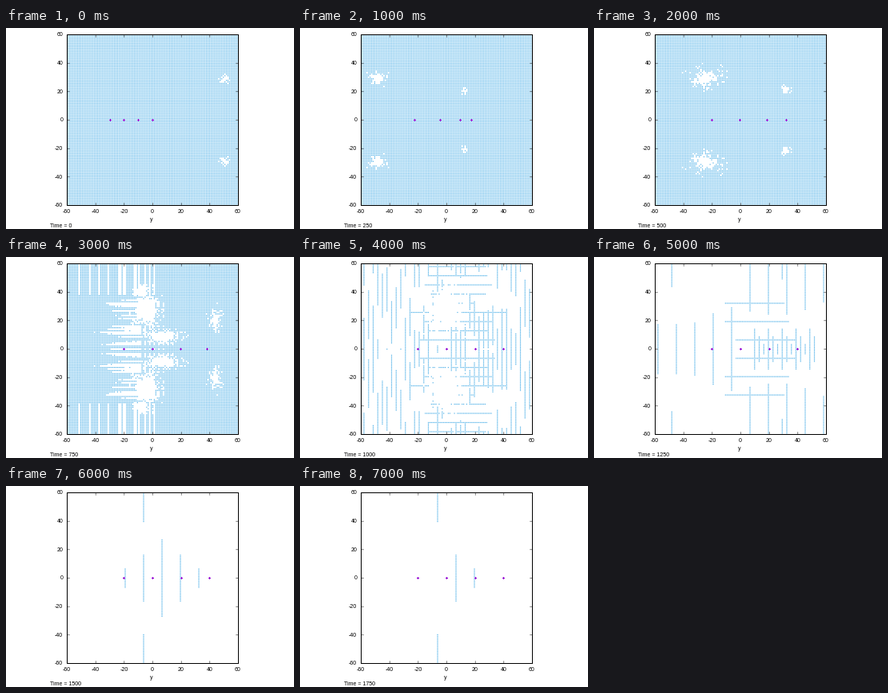
A matplotlib script that plays this animation: 360 px wide and 252 px high, repeating every 8000 ms.

```python
import numpy as np
import matplotlib.pyplot as plt
from matplotlib.animation import FuncAnimation

W, H = 360, 252
CX, CY, SCALE = 183.5, 115.5, 214 / 120
PITCH, DOT = 1.075, 1.2
SKY = np.array([0x56, 0xB4, 0xE9]) / 255
VIOLET = np.array([0x94, 0x00, 0xD3]) / 255
FRAMES, STEP = 8, 250

plt.rcParams["font.family"] = "Liberation Sans"
fig = plt.figure(figsize=(W / 72, H / 72), dpi=72, facecolor="white")
ax = fig.add_axes([0, 0, 1, 1])
ax.axis("off")


def px(x):
    return CX + SCALE * x


def py(y):
    return CY - SCALE * y


def coverage(centres, size):
    """How much of each pixel along one axis a dot at each centre covers."""
    c, e = centres[:, None], np.arange(size)[None, :]
    return np.clip(np.minimum(c + DOT / 2, e + 1) - np.maximum(c - DOT / 2, e), 0, 1)


# Lattice of test points; everything is symmetric about y = 0.
idx = np.arange(-55, 56)
I, J = np.meshgrid(idx, idx)
X, A = I * PITCH, abs(J) * PITCH
across = coverage(px(idx * PITCH), W)
down = coverage(py(idx * PITCH), H)

rng = np.random.default_rng(4)
grain = rng.random((56, 111))[abs(J), I + 55]
col_noise = rng.random(111)[I + 55]
row_noise = rng.random(56)[abs(J)]
main_col = I % 12 == 6


def hole(cx, cy, rx, ry, power=1.1):
    """Ragged gap around (cx, +-cy)."""
    return grain < power * np.exp(-((X - cx) / rx) ** 2 - ((A - cy) / ry) ** 2)


def dense(k):
    if k == 0:
        return ~hole(50, 29, 3, 2)
    left = hole(-71 + 23 * k, 29.5, 1 + 4 * k, 2 + 1.5 * k)
    right = hole(-7.5 + 19.5 * k, 21, 1 + 0.8 * k, 1 + 0.8 * k)
    return ~(left | right)


def thinned():
    zone = np.exp(-((X + 9) / 21) ** 2)
    upper = col_noise > 0.75 * zone
    lower = row_noise + 0.15 * grain > 0.6 * zone
    keep = np.where(A > 38, upper, lower)
    keep |= (X > -9) & (X < 22) & (I % 3 != 1)
    keep |= (X > 9) & (A > 13)
    gaps = (hole(-4, 28, 6, 9, 2) | hole(-8, 41, 4, 4, 1.6)
            | hole(7, 9, 9, 3, 2) | hole(44, 20, 4, 6))
    return keep & ~gaps


def sparse():
    band = np.sin(A / 9 + 7 * col_noise) + abs(X - 2) / 75
    keep = (I % 3 == 0) & (band > 0.45)
    keep |= (abs(J) % 6 == 0) & (A > 3) & (abs(X - 8) < 10 + 25 * row_noise)
    return keep & ~hole(0, 28, 9, 12, 2)


def late():
    inner = 18 + 12 * np.exp(-((X + 6.45) ** 2) / 300)
    outer = 24 + (X - 25) ** 2 / 130
    keep = main_col & np.where(X < 0, A < inner, A > outer)
    # A repeating fan of shorter columns on the right.
    n = I // 3
    keep |= (I % 3 == 0) & (n >= 3) & (n <= 16) & (A < 14 - 5 * (n % 3))
    keep |= ((I == -45) & (A > 43)) | ((I == 27) & (A > 49))
    bar = (abs(J) % 12 == 6) & (A < 35)
    keep |= bar & (X > np.maximum(-11, 0.9 - 0.65 * A)) & (X < 40 - 0.3 * A)
    return keep


def fading(height, left):
    inner = A < height - 0.78 * abs(X - 6.45)
    return main_col & (X > left) & inner | (I == -6) & (A > 39)


def mask(k):
    if k < 3:
        return dense(k)
    if k < 6:
        return (thinned, sparse, late)[k - 3]()
    return fading(27, -30) if k == 6 else fading(17, 0)


def bodies(t):
    """Four bodies drift right and spread to twice their spacing."""
    n = np.arange(4)
    lag = np.exp(-(t / (190 + 6.5 * n ** 3)) ** 1.5)
    return 20 * (n - 1) - 10 * (n + 1) * lag


def picture(k):
    cover = np.clip(down.T @ mask(k) @ across, 0, 1)
    img = 1 - cover[..., None] * (1 - SKY)
    r = int(CY)
    for c in px(bodies(k * STEP)).astype(int):
        img[r, c - 1:c + 2] = VIOLET
        img[r - 1:r + 2, c] = VIOLET
    return img


field = ax.imshow(np.ones((H, W, 3)), extent=(0, W, H, 0),
                  interpolation="nearest", aspect="auto", zorder=1)
ax.set_xlim(0, W)
ax.set_ylim(H, 0)


def line(xs, ys, lw):
    ax.plot(xs, ys, color="black", lw=lw, snap=False, zorder=2)


def label(x, y, s, ha="center"):
    return ax.text(x, y, s, ha=ha, va="baseline", fontsize=7, zorder=3)


L, R, T, B = px(-60), px(60), py(60), py(-60)
line([L, R, R, L, L], [T, T, B, B, T], 1)
for v in range(-60, 61, 20):
    x, y = px(v), py(v)
    for edge, inward in ((B, -3), (T, 3)):
        line([x, x], [edge, edge + inward], 0.5)
    for edge, inward in ((L, 3), (R, -3)):
        line([edge, edge + inward], [y, y], 0.5)
    label(x - 0.5, 232.5, str(v))
    label(71.3, y + 1.8, str(v), "right")
label(182, 242, "y")
clock = label(55.2, 250.5, "", "left")


def draw(k):
    field.set_data(picture(k))
    clock.set_text(f"Time = {k * STEP}")
    return field, clock


anim = FuncAnimation(fig, draw, frames=FRAMES, interval=1000, repeat=True,
                     repeat_delay=0, blit=False)
plt.show()
```
